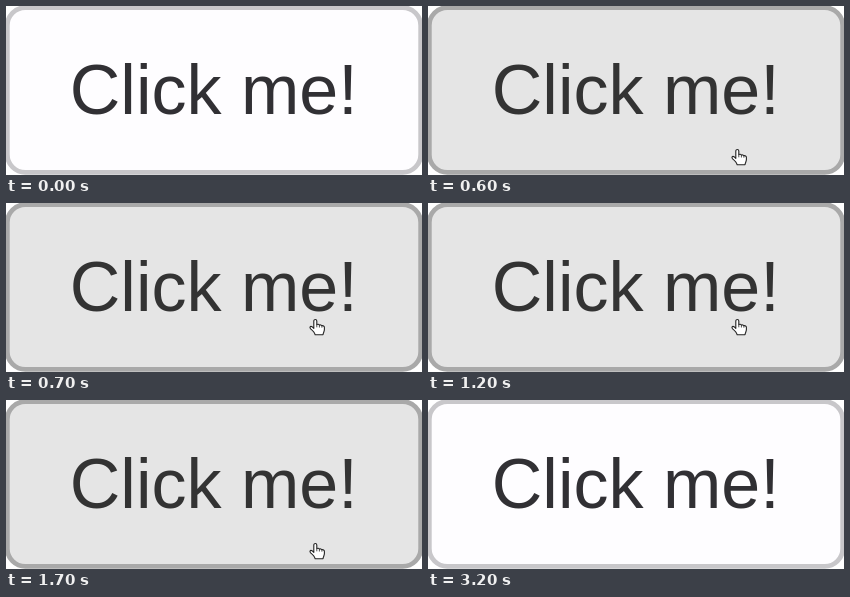
Recreate the animation shown at these times as an HTML page. Size 416x169 px, loop 3.3 s.

```html
<!DOCTYPE html>
<html lang="en">
<head>
<meta charset="utf-8">
<title>Button states</title>
<style>
  html, body { margin: 0; width: 100%; height: 100%; overflow: hidden; background: #fff; }
  svg { display: block; width: 416px; height: 169px; }
  text { font: 70px "Liberation Sans", Arial, sans-serif; }
</style>
</head>
<body>
<svg viewBox="0 0 416 169">
  <defs>
    <linearGradient id="inset" x1="0" y1="0" x2="0" y2="1">
      <stop offset="0" stop-color="#000" stop-opacity=".12"/>
      <stop offset=".5" stop-color="#000" stop-opacity=".04"/>
      <stop offset="1" stop-color="#000" stop-opacity="0"/>
    </linearGradient>
  </defs>
  <rect id="box" x="1.3" y="1.6" width="413.4" height="164.8" rx="18" stroke-width="4.8"/>
  <g id="ring">
    <rect x="9" y="9" width="398" height="150" rx="14" fill="#110f13"/>
    <rect x="19" y="19" width="378" height="130" rx="8" fill="#d4d3d5"/>
    <path d="M19 41V27a8 8 0 0 1 8-8H389a8 8 0 0 1 8 8V41Z" fill="url(#inset)"/>
  </g>
  <text id="label" x="207.7" y="107.6" text-anchor="middle">Click me!</text>
  <g id="hand">
    <path id="palm" d="M5.4 10.4V2.9C5.4 1 8.4 1 8.4 2.9V6.6C9.2 6 10.6 6.2 11 7.1 11.9 6.6 13.1 6.9 13.5 7.8 14.7 7.4 16 8 16 9.4V11.6C16 13.6 14.9 14.6 14.6 16.8H6.8C6.4 14.6 4.6 12.8 2.2 10.8.8 9.4 2 7.7 3.6 8.7Z"
      fill="#fff" stroke="#222" stroke-width="1.1" stroke-linejoin="round"/>
    <path d="M8.4 6.6V9.3M11 7.1V9.5M13.5 7.8V9.7" stroke="#222" stroke-width=".8"/>
  </g>
</svg>
<script>
  const LOOP = 3300;
  const IDLE = { fill: "#fefdff", edge: "#c8c7ca", ink: "#313034" };
  const HOVER = { fill: "#e5e5e5", edge: "#a9a9a9", ink: "#333333" };
  const PRESS = { fill: "#fefdff", edge: "#8b898c", ink: "#333235", ring: true };
  const FOCUS = { fill: "#e5e5e5", edge: "#888888", ink: "#333333" };

  // start time, look, top of the pointer (none = hidden)
  const steps = [
    [0, IDLE],
    [500, HOVER],
    [600, HOVER, 142],
    [700, HOVER, 115],
    [1100, PRESS, 115],
    [1200, HOVER, 115],
    [1700, HOVER, 142],
    [1800, HOVER],
    [1900, FOCUS],
    [3200, IDLE]
  ];

  const [box, ring, label, hand] =
    ["box", "ring", "label", "hand"].map(id => document.getElementById(id));
  const show = (el, on) => el.setAttribute("visibility", on ? "visible" : "hidden");

  function draw(time) {
    const [, look, top] = steps.findLast(step => step[0] <= time);
    box.setAttribute("fill", look.fill);
    box.setAttribute("stroke", look.edge);
    label.setAttribute("fill", look.ink);
    show(ring, look.ring);
    show(hand, top !== undefined);
    if (top !== undefined) hand.setAttribute("transform", `translate(302.4 ${top})`);
  }

  const start = performance.now();
  function tick() {
    draw((performance.now() - start) % LOOP);
    requestAnimationFrame(tick);
  }
  tick();
</script>
</body>
</html>
```
